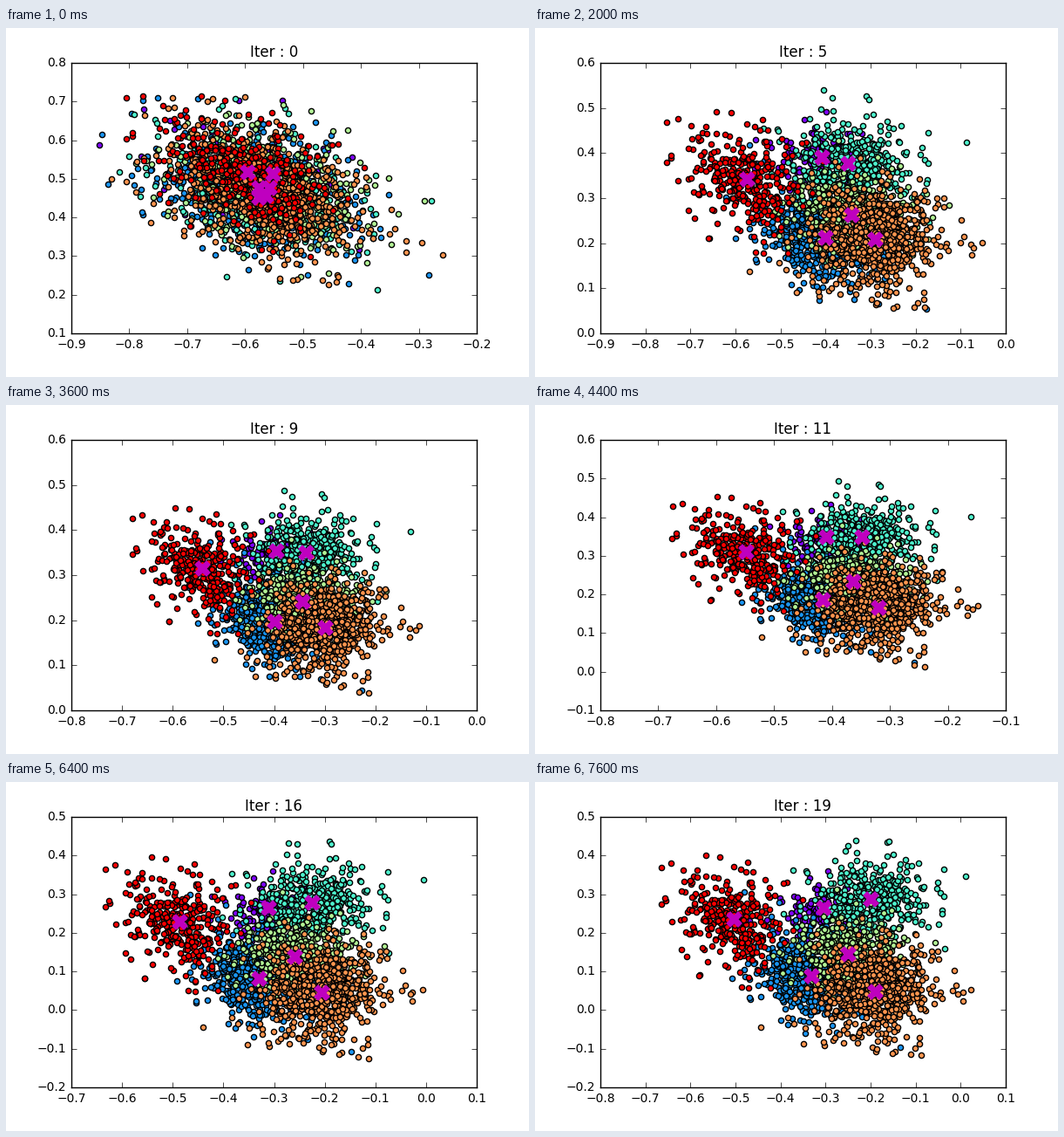
A matplotlib script for the animation above (8 s loop, 600 by 400 pixels).

```python
import numpy as np
import matplotlib.pyplot as plt
from matplotlib.animation import FuncAnimation

plt.style.use("classic")
plt.rcParams.update({
    "figure.dpi": 100, "savefig.dpi": 100, "figure.facecolor": "white",
    "font.family": "DejaVu Sans", "font.size": 10,
    "axes.titlesize": 12, "axes.titlepad": 5,
})

ITERATIONS = 20
INTERVAL = 400
CLASSES = 6

# Extent of the whole cloud (x0, x1, y0, y1) at key iterations.
EXTENT = {
    0: (-.856, -.235, .21, .715),
    2: (-.97, -.042, .08, .63),
    4: (-.90, .01, .01, .56),
    5: (-.786, -.046, .045, .54),
    7: (-.75, -.08, -.01, .52),
    9: (-.71, -.105, .037, .493),
    12: (-.70, -.16, 0, .50),
    14: (-.702, -.17, .015, .47),
    16: (-.66, -.005, -.13, .44),
    19: (-.69, .025, -.125, .44),
}

# Class centres as fractions of the extent, in drawing order.
LAYOUT = {
    0: [(.49, .60), (.45, .48), (.45, .53), (.48, .53), (.47, .49), (.42, .61)],
    2: [(.61, .70), (.60, .39), (.64, .53), (.62, .41), (.69, .39), (.375, .68)],
    5: [(.51, .70), (.52, .34), (.59, .67), (.60, .44), (.67, .33), (.285, .60)],
    19: [(.54, .69), (.50, .38), (.685, .73), (.615, .48), (.70, .305), (.26, .64)],
}

# Spread (sd x, sd y, correlation) of the mixed cloud and of each settled class.
MIXED = np.array([.136, .165, -.4])
SETTLED = np.array([(.065, .065, .1), (.08, .11, -.25), (.095, .095, 0),
                    (.085, .08, -.1), (.095, .11, .1), (.09, .125, -.2)])

COUNTS = (130, 600, 420, 480, 720, 310)
COLORS = plt.cm.rainbow(np.linspace(0, 1, CLASSES))

rng = np.random.default_rng(7)
latent = [rng.standard_normal((n, 2)) * rng.uniform(.6, 1.25, (n, 1))
          for n in COUNTS]


def between(keys, i):
    """Linear blend of the neighbouring key values."""
    before = max(k for k in keys if k <= i)
    after = min(k for k in keys if k >= i)
    t = (i - before) / max(after - before, 1)
    return (1 - t) * np.array(keys[before]) + t * np.array(keys[after])


def place(fractions, extent):
    x0, x1, y0, y1 = extent
    return (x0, y0) + fractions * (x1 - x0, y1 - y0)


def members(i, group, centre):
    settled = SETTLED[group]
    sx, sy, r = settled + (MIXED - settled) * np.exp(-i / 2.5)
    u, v = latent[group].T
    offsets = np.column_stack([sx * u, sy * (r * u + np.sqrt(1 - r * r) * v)])
    # Fold stray points back inside the extent.
    return 1 - np.abs(1 - np.abs(centre + offsets))


def round_ticks(low, high):
    """Pad by 5 % and extend to whole tick steps."""
    pad = .05 * (high - low)
    low, high = low - pad, high + pad
    step = .1 if high - low <= .9 else .2
    first, last = np.floor(low / step), np.ceil(high / step)
    return np.round(np.arange(first, last + 1) * step, 1) + 0.0


fig = plt.figure(figsize=(6, 4))
ax = fig.add_axes([.125, .125, .775, .775])
title = ax.set_title("", x=.4993)
dots = [ax.scatter([], [], s=20, color=[c], edgecolors="k", linewidths=1)
        for c in COLORS]
marks = ax.scatter([], [], s=100, marker="x", color=(.75, 0, .75),
                   linewidths=5, zorder=3)


def update(i):
    extent = between(EXTENT, i)
    centres = between(LAYOUT, i)
    for group, dot in enumerate(dots):
        dot.set_offsets(place(members(i, group, centres[group]), extent))
    marks.set_offsets(place(centres, extent))

    xticks, yticks = round_ticks(*extent[:2]), round_ticks(*extent[2:])
    ax.set_xticks(xticks)
    ax.set_yticks(yticks)
    ax.set_xlim(xticks[0], xticks[-1])
    ax.set_ylim(yticks[0], yticks[-1])
    title.set_text(f"Iter : {i}")
    return [*dots, marks, title]


anim = FuncAnimation(fig, update, frames=ITERATIONS, interval=INTERVAL,
                     repeat=True, repeat_delay=0, blit=False)
plt.show()
```
